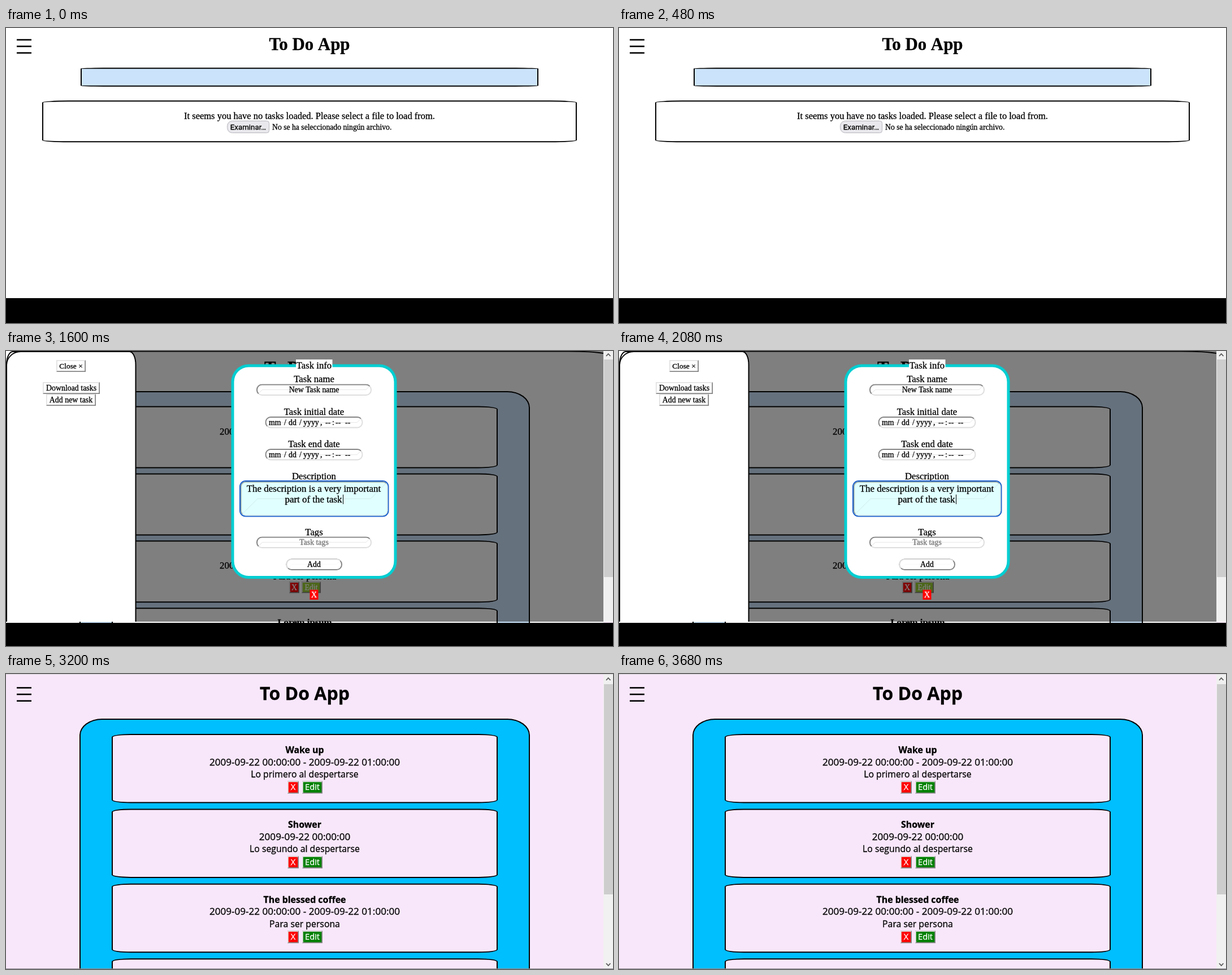
An HTML page with a canvas for the animation above (4 s loop, 1074x522 px).

```html
<!DOCTYPE html>
<html lang="en">
<head>
<meta charset="utf-8">
<title>To Do App</title>
<style>
  html, body { margin: 0; width: 100%; height: 100%; overflow: hidden; background: #000; }
  canvas { display: block; }
</style>
</head>
<body>
<canvas id="stage" width="1074" height="522"></canvas>
<script>
const ctx = document.getElementById('stage').getContext('2d');
const W = 1074, H = 522, STEP = 800;
const SERIF = '"Liberation Serif", serif';
const SANS = '"Open Sans", sans-serif';

const tasks = [
  ['Wake up', '2009-09-22 00:00:00 - 2009-09-22 01:00:00', 'Lo primero al despertarse'],
  ['Shower', '2009-09-22 00:00:00', 'Lo segundo al despertarse'],
  ['The blessed coffee', '2009-09-22 00:00:00 - 2009-09-22 01:00:00', 'Para ser persona'],
  ['Lorem ipsum', '', '']
];

const light = {
  font: SERIF, bg: '#fff', panel: '#cce4fb', edit: '#9acd32',
  title: [30.9, 39], menu: 32.5, top: 70, first: 96.5, pitch: 118.9, height: 110,
  sizes: [16.8, 16.95, 17.05], lines: [31.5, 50, 68.5],
  button: { y: 73, h: 20, x: [501, 18], edit: [523, 34], size: 13.8 }
};
const pink = {
  font: SANS, bg: '#f8e7fa', panel: '#00bfff', edit: '#008000',
  title: [32, 46], menu: 36, top: 79, first: 106, pitch: 132.4, height: 122.5,
  sizes: [15.9, 17.1, 15.8], lines: [34, 55.5, 77],
  button: { y: 83.5, h: 22, x: [498, 20], edit: [524, 36], size: 14.7 }
};

function rect(x, y, w, h, fill) {
  ctx.fillStyle = fill;
  ctx.fillRect(x, y, w, h);
}

function text(str, x, y, size, { font = SERIF, bold = false, color = '#000', align = 'center' } = {}) {
  ctx.font = `${bold ? 'bold ' : ''}${size}px ${font}`;
  ctx.textAlign = align;
  ctx.fillStyle = ctx.strokeStyle = color;
  ctx.lineWidth = 0.3;
  ctx.lineJoin = 'round';
  ctx.fillText(str, x, y);
  ctx.strokeText(str, x, y);
}

function round(x, y, w, h, rx, ry = rx) {
  ctx.beginPath();
  ctx.roundRect(x, y, w, h, { x: Math.max(0, rx), y: Math.max(0, ry) });
}

// Bordered box with elliptical corners
function box(x, y, w, h, rx, ry, fill, border = '#000', b = 2) {
  round(x, y, w, h, rx, ry);
  ctx.fillStyle = border;
  ctx.fill();
  round(x + b, y + b, w - 2 * b, h - 2 * b, rx - b, ry - b);
  ctx.fillStyle = fill;
  ctx.fill();
}

// Two-tone border: one colour for top and left, another for bottom and right
function bevel(x, y, w, h, r, fill, topLeft, bottomRight, b = 2) {
  const m = h / 2;
  box(x, y, w, h, r, r, fill, bottomRight, b);
  ctx.save();
  ctx.beginPath();
  ctx.moveTo(x, y);
  ctx.lineTo(x + w, y);
  ctx.lineTo(x + w - m, y + m);
  ctx.lineTo(x + m, y + m);
  ctx.lineTo(x, y + h);
  ctx.clip();
  box(x, y, w, h, r, r, fill, topLeft, b);
  ctx.restore();
}

function button(label, x, y, w, h, fill, color, size = 13.8, font = SERIF) {
  bevel(x, y, w, h, 0, fill, '#e2e2e2', '#858585', 1.8);
  text(label, x + w / 2, y + h / 2 + size * 0.33, size, { font, color });
}

function menu(y) {
  for (const d of [-11.6, 0, 11.6]) rect(19, y + d - 1.3, 26, 2.6, '#000');
}

function chevron(y, dir) {
  ctx.beginPath();
  ctx.moveTo(1062, y + 2 * dir);
  ctx.lineTo(1065.7, y - 2 * dir);
  ctx.lineTo(1069.4, y + 2 * dir);
  ctx.strokeStyle = '#555';
  ctx.lineWidth = 1.8;
  ctx.lineJoin = 'miter';
  ctx.stroke();
}

function scrollbar(arrow, from, to, track) {
  rect(1057, 0, 17, H, track);
  rect(1057, 0, 17, from, '#f0f0f0');
  rect(1058, from, 16, to - from, '#cdcdcd');
  chevron(arrow, 1);
}

function page(s) {
  const cx = 528.5, b = s.button;
  rect(0, -10, 1057, H + 20, s.bg);
  menu(s.menu);
  text('To Do App', cx, s.title[1], s.title[0], { font: s.font, bold: true });
  box(130, s.top, 797, 700, 40, 29, s.panel);
  tasks.forEach((lines, i) => {
    const y = s.first + i * s.pitch;
    box(187, y, 683, s.height, 34, 5.7, s.bg);
    lines.forEach((line, k) =>
      text(line, cx, y + s.lines[k], s.sizes[k], { font: s.font, bold: k === 0 }));
    button('X', b.x[0], y + b.y, b.x[1], b.h, '#f00', '#fff', b.size, s.font);
    button('Edit', b.edit[0], y + b.y, b.edit[1], b.h, s.edit, '#fff', b.size, s.font);
  });
}

function field(x, y, w, value, color = '#000') {
  bevel(x, y, w, 20.5, 10, '#fff', '#858585', '#dedede');
  if (value) text(value, 545, y + 14.8, 13.8, { color });
}

function dateField(y) {
  field(458.5, y, 173);
  const parts = [['mm', 465], ['/', 492], ['dd', 500], ['/', 519], ['yyyy', 526], [',', 556],
    ['--', 565], [':', 577], ['--', 583], ['--', 600]];
  for (const [str, x] of parts) text(str, x, y + 15, 13.9, { align: 'left' });
}

function form({ name, lines, tags, action }) {
  box(398.5, 23.5, 293, 379.5, 31, 31, '#fff', '#00ced1', 5);
  rect(513, 15, 64.5, 21, '#fff');
  const labels = [['Task info', 31], ['Task name', 55], ['Task initial date', 112.5],
    ['Task end date', 169.5], ['Description', 227], ['Tags', 325.5]];
  for (const [str, y] of labels) text(str, 545, y, 16.7);
  field(443, 58.5, 204, name);
  dateField(116);
  dateField(173);
  box(413, 229, 264.5, 64.5, 11, 11, '#e0ffff', '#1b5fcc');
  bevel(415, 231, 260.5, 60.5, 9, '#e0ffff', '#8a9a9a', '#d3e6e6', 1.5);
  lines.forEach((str, i) => text(str, 545 - i / 2 - 0.5, 249 + i * 18.5, 16.95));
  const last = lines.length - 1;
  const caret = 546 - last / 2 + ctx.measureText(lines[last]).width / 2;
  rect(caret, 235.5 + last * 18.5, 1, 17, '#000');
  field(443, 328.5, 204, tags, '#757575');
  bevel(495.5, 367.5, 99.5, 20.5, 10, '#fff', '#dedede', '#858585');
  text(action, 545, 382.3, 13.8);
}

function clipTo(bottom, draw, dy = 0) {
  ctx.save();
  ctx.beginPath();
  ctx.rect(0, 0, W, bottom);
  ctx.clip();
  ctx.translate(0, dy);
  draw();
  ctx.restore();
}

function stroke(width, path) {
  ctx.beginPath();
  path();
  ctx.strokeStyle = '#000';
  ctx.lineWidth = width;
  ctx.stroke();
}

function corner(rx, ry, x = 1, y = 1) {
  ctx.ellipse(x + rx, y + ry, rx, ry, 0, Math.PI, Math.PI * 1.5);
}

function emptyScene() {
  rect(0, 0, W, 478, '#fff');
  menu(32.5);
  text('To Do App', 537, 39, 30.9, { bold: true });
  box(132, 70.3, 810, 33.4, 40, 1.7, '#cce4fb');
  box(64, 128.3, 946, 74, 47, 3.7, '#fff');
  text('It seems you have no tasks loaded. Please select a file to load from.', 537, 160.5, 16.5);
  ctx.beginPath();
  ctx.roundRect(391.5, 164.5, 74, 21, [9, 4, 4, 9]);
  ctx.fillStyle = '#e9e9ed';
  ctx.fill();
  ctx.strokeStyle = '#b4b4bc';
  ctx.lineWidth = 1;
  ctx.stroke();
  text('Examinar…', 428.5, 180, 13.3, { font: 'Roboto, sans-serif' });
  text('No se ha seleccionado ningún archivo.', 471, 180.3, 13.7, { align: 'left' });
}

function listScene() {
  clipTo(481, () => {
    page(light);
    scrollbar(6, 15, 427, '#f4e9f5');
  });
}

function addScene() {
  listScene();
  clipTo(479, () => {
    ctx.save();
    ctx.translate(0, 1);
    page(light);
    ctx.restore();
    rect(0, 0, 1057, H, 'rgba(0,0,0,.5)');
    stroke(2, () => {
      ctx.moveTo(0, 0.5);
      ctx.lineTo(995, 0.5);
      ctx.quadraticCurveTo(1035, 0.5, 1057, 4);
    });
    rect(0, 0, 26, 26, '#fff');
    box(0, 0, 230.5, 540, 12, 24, '#fff');
    stroke(1.8, () => corner(25, 24));
    button('Close ×', 89, 16, 52, 21, '#fff', '#000', 13.4);
    button('Download tasks', 65, 55, 101, 21, '#fff', '#000', 13.9);
    button('Add new task', 71, 76, 88, 21, '#fff', '#000', 13.9);
    form({
      name: 'New Task name',
      lines: ['The description is a very important', 'part of the task'],
      tags: 'Task tags', action: 'Add'
    });
    rect(537.5, 422.5, 15, 17.5, '#f00');
    text('X', 545, 436, 13.8, { color: '#fff' });
    scrollbar(7, 15, 400, '#f0f0f0');
  });
}

function editScene() {
  clipTo(484.5, () => {
    page(light);
    ctx.translate(0, -1);
    form({ name: 'Edited task name', lines: ['Edited description'], tags: 'undefined', action: 'Update' });
    button('Close', 525, 421.5, 40.5, 19.5, '#f00', '#fff');
  }, -5.5);
  clipTo(484.5, () => {
    stroke(1.6, () => {
      ctx.moveTo(0.6, 485);
      corner(16, 19, 0.6, 1.2);
      ctx.lineTo(1057, 1.2);
    });
    scrollbar(10, 27, 411, '#eaeff3');
  });
}

function pinkScene() {
  page(pink);
  scrollbar(9, 18, 390, '#f1f1f1');
  chevron(514, -1);
  rect(0, 0, W, 1, '#d9d4da');
  rect(0, 521, W, 1, '#8d8890');
}

const scenes = [emptyScene, listScene, addScene, editScene, pinkScene];
let shown = -1;

function tick() {
  const i = Math.floor(performance.now() / STEP) % scenes.length;
  if (i !== shown) {
    rect(0, 0, W, H, '#000');
    scenes[i]();
    shown = i;
  }
  requestAnimationFrame(tick);
}
tick();
</script>
</body>
</html>
```
